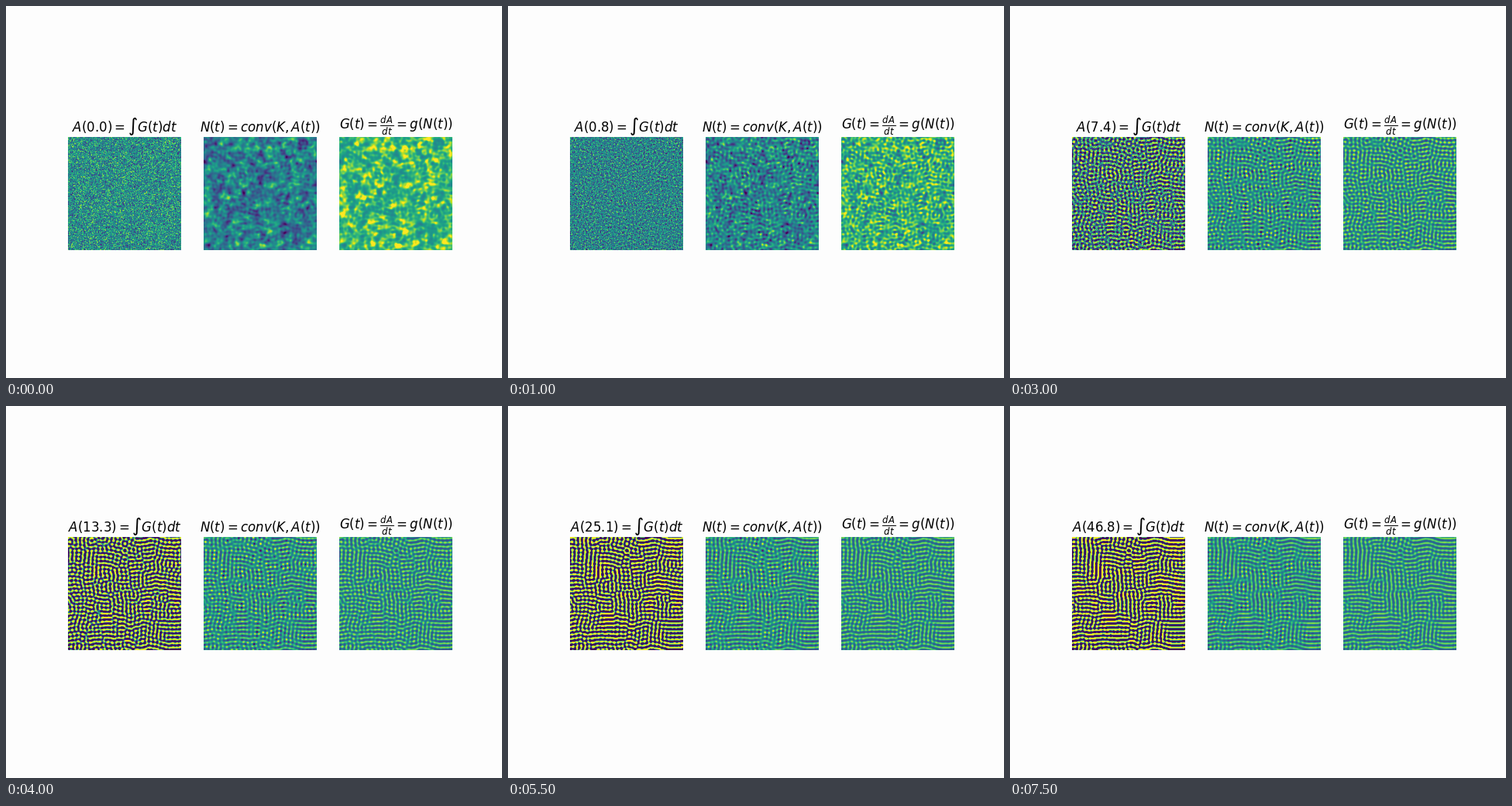
Write a matplotlib script that moves like this. It is 640 by 480 pixels and loops after 8000 ms.

```python
import numpy as np
import matplotlib.pyplot as plt
from matplotlib.animation import FuncAnimation

SIZE = 200        # cells per side
FRAMES = 16
STEP = 0.1        # time per simulation step
RATE = 0.18
SOFT = 0.1
BALANCE = 0.44    # mean activity the pattern settles to

# Kernel spectrum: broad inhibition plus a ring of excitation,
# stronger along the two grid axes.
kx = 2 * np.pi * np.fft.rfftfreq(SIZE)[None, :]
ky = 2 * np.pi * np.fft.fftfreq(SIZE)[:, None]
k = np.hypot(kx, ky)
axes_bias = 1 + 0.18 * np.cos(4 * np.arctan2(ky, kx))
KERNEL = (0.33 * axes_bias * np.exp(-((k - 0.86) / 0.12) ** 2 / 2)
          - np.exp(-(k / 0.40) ** 2 / 2))


def conv(a):
    return np.fft.irfft2(KERNEL * np.fft.rfft2(a), s=a.shape)


def growth(n):
    return np.tanh((n + BALANCE) / SOFT)


def steps_at(i):
    """Simulation steps done by the i-th picture; time runs quadratically."""
    return 208 * i * i // 100


def simulate():
    a = np.random.default_rng(7).random((SIZE, SIZE))
    states, done = [], 0
    for i in range(FRAMES):
        while done < steps_at(i):
            a = np.clip(a + STEP * RATE * growth(conv(a)), 0, 1)
            done += 1
        states.append(a)
    return states


def show(image, data, below, above):
    """Display data with colour limits given in standard deviations."""
    mean, dev = data.mean(), data.std()
    image.set_data(data)
    image.set_clim(mean - below * dev, mean + above * dev)


states = simulate()

fig, axes = plt.subplots(1, 3, figsize=(6.4, 4.8), dpi=100)
fig.set_facecolor("#fdfdfd")
images = []
for ax in axes:
    images.append(ax.imshow(states[0], cmap="viridis", vmin=0, vmax=1))
    ax.axis("off")
img_a, img_n, img_g = images

PAD = 5.3
title = axes[0].set_title("", pad=PAD)
axes[1].set_title(r"$N(t) = conv(K, A(t))$", pad=PAD)
axes[2].set_title(r"$G(t) = \frac{dA}{dt} = g(N(t))$", pad=PAD)


def update(i):
    a, t = states[i], steps_at(i) * STEP
    n = conv(a)
    early = np.exp(-t / 2)
    img_a.set_data(a)
    show(img_n, n, 2.6 + 0.6 * early, 2.4 + 1.9 * early)
    show(img_g, growth(n), 2.6 + 2.2 * early, 2.3 - 0.1 * early)
    title.set_text(rf"$A({t:.1f}) = \int G(t)dt$")
    return images + [title]


anim = FuncAnimation(fig, update, frames=FRAMES, interval=500,
                     repeat=True, repeat_delay=0, blit=False)
plt.show()
```
